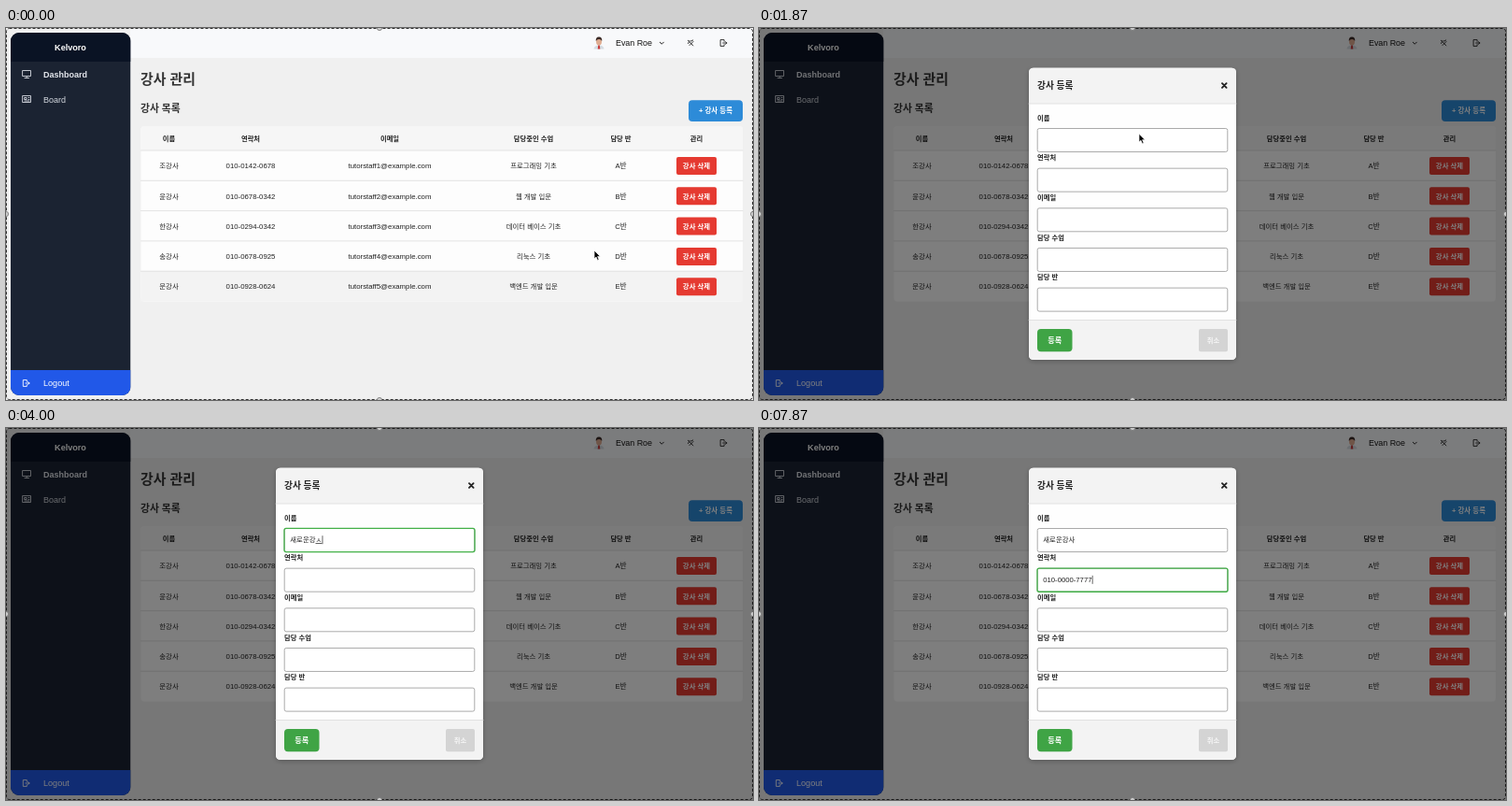
Write an HTML page that moves like this. It is 800 px wide and 398 px high and loops after 8000 ms.

```html
<!DOCTYPE html>
<html lang="ko">
<head>
<meta charset="utf-8">
<title>강사 관리</title>
<style>
html, body { margin: 0; width: 100%; height: 100%; overflow: hidden; background: #f0f0f0; }
svg { display: block; width: 100%; height: 100%; }
text { font-family: 'Liberation Sans', 'Noto Sans CJK KR', 'Noto Sans CJK', sans-serif; white-space: pre; }
.ui { font-family: Inter, 'Noto Sans CJK KR', 'Noto Sans CJK', sans-serif; }
.line { fill: none; stroke-linecap: round; stroke-linejoin: round; }
</style>
</head>
<body>
<svg id="stage" viewBox="0 0 800 398"></svg>
<script>
const LOOP = 8000, OPEN = 1000, FOCUS = 2250, TYPE = 2870, NEXT = 4700;
const ROW_TOP = 131, ROW_H = 32.3;
const teachers = [
  ['조강사', '010-0142-0678', '프로그래밍 기초', 'A반'],
  ['윤강사', '010-0678-0342', '웹 개발 입문', 'B반'],
  ['한강사', '010-0294-0342', '데이터 베이스 기초', 'C반'],
  ['송강사', '010-0678-0925', '리눅스 기초', 'D반'],
  ['문강사', '010-0928-0624', '백엔드 개발 입문', 'E반']
];
const labels = ['이름', '연락처', '이메일', '담당 수업', '담당 반'];
const fieldY = i => 107.5 + i * 42.65;
const strokes = ['ㅅ', '새', '샐', '새로', '새롱', '새로우', '새로운', '새로운ㄱ', '새로운가', '새로운강', '새로운강ㅅ', '새로운강사'];
const phone = '010-0000-7777';
const hints = [
  ['나도율', 'demo27', '배강사', '새로운강사', '새로운 강사', 'name52'],
  ['010-0231-0025', '010-0234-0056']
];

// Markup helpers
const rect = (x, y, w, h, fill, r = 0, more = '') =>
  `<rect x="${x}" y="${y}" width="${w}" height="${h}" rx="${r}" fill="${fill}" ${more}/>`;
const text = (x, y, s, size, fill = '#222', weight = 400, anchor = 'start', more = '') =>
  `<text x="${x}" y="${y}" font-size="${size}" fill="${fill}" font-weight="${weight}" text-anchor="${anchor}" ${more}>${s}</text>`;
const mid = (x, y, s, size, fill, weight) => text(x, y, s, size, fill, weight, 'middle');
const line = (d, color, w = 1) => `<path class="line" d="${d}" stroke="${color}" stroke-width="${w}"/>`;
const exitIcon = (x, y, color) =>
  line(`M${x + .8} ${y - 1.8}v-1.6h-4v6.8h4v-1.6M${x - .6} ${y}h4.2m-1.4-1.4l1.4 1.4l-1.4 1.4`, color, .9);

function sidebar() {
  return `<g clip-path="url(#side)">` + rect(5, 5, 128.5, 388, '#1b2332') +
    rect(5, 5, 128.5, 31, '#0a1324') + rect(5, 366, 128.5, 27, '#2158e8') + '</g>' +
    mid(69, 23.8, 'Kelvoro', 9.1, '#fff', 700) +
    text(40, 52.8, 'Dashboard', 9, '#e3e6ec', 700) +
    text(40, 79.5, 'Board', 9, '#d5d9e0') +
    text(40, 383, 'Logout', 9.1, '#fff') +
    line('M18 45.5h8.5v6h-8.5zM22.2 51.5v2M20 53.5h4.5', '#d5d9e0', .9) +
    line('M18 72.5h8.5v7h-8.5zM20 74.5h2v2h-2zM24 74.5h1M24 76.5h1M20 78h5', '#d5d9e0', .9) +
    exitIcon(21.5, 380, '#fff');
}

function topbar() {
  return rect(133, 0, 667, 32, '#f8f9fb') +
    '<path d="M629.5 22.5q.5-4 5.5-4t5.5 4z" fill="#d5dde3"/>' +
    '<ellipse cx="635" cy="14.5" rx="3" ry="4" fill="#dfac91"/>' +
    '<path d="M631.8 14q-.5-4.5 3.2-4.5t3.2 4.5q-1-2-3.2-2t-3.2 2z" fill="#3b2b27"/>' +
    '<path d="M634.2 18.5h1.6l.5 4h-2.6z" fill="#c93a3a"/>' +
    text(653, 19.3, 'Evan Roe', 8.9, '#111') +
    line('M700.3 15.2l2 2l2-2', '#222') +
    line('M730.3 13.2l5.6 5.6M730.5 16.5l1.6-3M733.3 14.2l2.4-1.2M732 18.5l4-4', '#222', .9) +
    exitIcon(768.3, 16, '#222');
}

function table() {
  const cols = [174.5, 262, 411, 565, 658.5, 739.5];
  let s = rect(144.5, 105, 644.5, 187.8, '#fdfdfd', 4) +
    '<path d="M144.5 131v-22q0-4 4-4h636.5q4 0 4 4v22z" fill="#f6f6f6"/>' +
    rect(144.5, 0, 644.5, ROW_H, '#f3f3f3', 0, 'id="hover"');
  ['이름', '연락처', '이메일', '담당중인 수업', '담당 반', '관리']
    .forEach((h, i) => s += mid(cols[i], 121, h, 7.3, '#222', 700));
  teachers.forEach(([name, tel, course, group], i) => {
    const y = ROW_TOP + i * ROW_H, b = y + 19.2;
    s += line(`M144.5 ${y}H789`, '#dcdcdc', .8) +
      mid(cols[0], b, name, 7.4) + mid(cols[1], b, tel, 7.8) +
      mid(cols[2], b, `tutorstaff${i + 1}@example.com`, 7.8) +
      mid(cols[3], b, course, 7.4) + mid(cols[4], b, group, 7.6) +
      rect(718, y + 7, 43, 19, '#e53a31', 2) + mid(cols[5], b, '강사 삭제', 7.4, '#fff', 700);
  });
  return s;
}

function modal() {
  let s = rect(0, 0, 800, 398, '#000', 0, 'opacity=".5"') +
    rect(289, 42.7, 222, 312.3, '#fefefe', 5, 'filter="url(#shadow)"') +
    '<path d="M289 81V47.7q0-5 5-5h212q5 0 5 5v33.3zM289 312.5v37.5q0 5 5 5h212q5 0 5-5v-37.5z" fill="#f3f3f3"/>' +
    line('M289 81H511M289 312.5H511', '#dcdcdc', .8) +
    text(298, 65, '강사 등록', 9.7, '#222', 700) +
    line('M496 59.2l4.6 4.6m0-4.6l-4.6 4.6', '#222', 1.9);
  labels.forEach((l, i) => s += text(298, fieldY(i) - 8.7, l, 7.3, '#222', 700) +
    rect(298.2, fieldY(i), 203.6, 25, '#fff', 2, 'stroke="#aaa"'));
  return s + rect(298, 322, 37.5, 24.3, '#3fa445', 4) + mid(316.7, 337.2, '등록', 8.2, '#fff', 700) +
    rect(471, 322, 31, 24.3, '#d4d4d4', 2) + mid(486.5, 336.8, '취소', 7.3, '#f6f6f6', 700) +
    rect(298, 0, 204, 25.2, 'none', 2, 'id="ring" stroke="#43b048" stroke-width="1.3"') +
    text(304.3, fieldY(0) + 14.8, '', 7.4, '#222', 400, 'start', 'id="name"') +
    text(304.3, fieldY(1) + 14.8, '', 7.7, '#222', 400, 'start', 'id="tel"') +
    rect(0, 0, .7, 9, '#222', 0, 'id="caret"') +
    '<g id="badge"><path d="M298 128l-1-2l5 .3z" fill="#1d5be0"/>' +
    rect(296.3, 126.2, 16.4, 12, '#1d5be0', 6) + mid(304.5, 134.4, '한', 6, '#fff') + '</g><g id="list"></g>';
}

const border = rect(.5, .5, 799, 397, 'none', 3, 'stroke="#ddd"') +
  rect(.5, .5, 799, 397, 'none', 3, 'stroke="#333" stroke-dasharray="3 2"');
const handles = [[400, 0], [400, 398], [0, 199], [800, 199]]
  .map(([x, y]) => `<circle cx="${x}" cy="${y}" r="2.6" fill="#ccc" stroke="#777" stroke-width=".8"/>`).join('');
const shadow = (id, dy, blur, alpha) =>
  `<filter id="${id}" x="-20%" y="-20%" width="140%" height="140%"><feDropShadow dx="0" dy="${dy}" stdDeviation="${blur}" flood-opacity="${alpha}"/></filter>`;

const $ = id => document.getElementById(id);
$('stage').innerHTML = `<defs><clipPath id="side">${rect(5, 5, 128.5, 388, '#000', 9)}</clipPath>` +
  shadow('shadow', 1.5, 2.5, .25) + shadow('soft', .5, 1, .25) + '</defs>' +
  rect(0, 0, 800, 398, '#f0f0f0') + topbar() + sidebar() +
  text(144, 59.5, '강사 관리', 14.9, '#333', 700) + text(144, 89.7, '강사 목록', 10.8, '#333', 700) +
  table() + rect(731, 77.3, 58, 22.7, '#2d8bd8', 4, 'id="add"') +
  '<path id="edge" class="line" d="M732 97.5q1 2.2 3 2.2h50q2 0 3-2.2" stroke="#4be04f" stroke-width="1.4"/>' +
  text(760, 91.4, '+ 강사 등록', 7.5, '#fff', 700, 'middle', 'id="addText"') +
  border + `<g id="modal">${modal()}</g>` + handles +
  '<path id="cursor" d="M0 0v8.8l2-1.8l1.5 3.4l1.6-.7l-1.5-3.3h2.8z" fill="#000" stroke="#fff" stroke-width=".7"/>';

// Pointer path: time, x, y
const path = [[-120, 630, 270], [0, 630, 238], [120, 630, 238], [620, 751, 86], [1120, 751, 86], [1950, 398, 114]];
function pointer(t) {
  const i = path.findIndex(p => p[0] > t);
  if (i < 0) return path.at(-1).slice(1);
  if (!i) return path[0].slice(1);
  const [a, b] = [path[i - 1], path[i]];
  const u = (t - a[0]) / (b[0] - a[0]), k = u * u * (3 - 2 * u);
  return [a[1] + (b[1] - a[1]) * k, a[2] + (b[2] - a[2]) * k];
}
const clamp = (v, lo, hi) => Math.max(lo, Math.min(hi, v));
const show = (id, on) => $(id).style.display = on ? '' : 'none';
const mix = (a, b, k) => `rgb(${a.map((v, i) => Math.round(v + (b[i] - v) * k))})`;

function drawList(field, typed) {
  const items = hints[field].filter(h => h.startsWith(typed) && h !== typed);
  show('list', items.length);
  const y = fieldY(field) + 30.5;
  $('list').innerHTML = rect(353, y, 86.7, items.length * 20 + 5, '#fafafa', 5, 'filter="url(#soft)"') +
    `<path d="M359.5 ${y + .5}l4.5-4l4.5 4z" fill="#fafafa"/>` +
    items.map((h, i) => text(359.7, y + 14.5 + i * 20, h, 6.85, '#222', 600, 'start', 'class="ui"')).join('');
}

function render(t) {
  const [x, y] = pointer(t), [hx, hy] = pointer(t - 120);
  $('cursor').setAttribute('transform', `translate(${x} ${y})`);
  show('cursor', t < TYPE);

  const row = Math.floor((hy - ROW_TOP) / ROW_H);
  show('hover', row >= 0 && row < 5 && hx < 789 && t < OPEN);
  $('hover').setAttribute('y', ROW_TOP + row * ROW_H);

  const pressed = t >= OPEN && t < OPEN + 120;
  const green = t < OPEN ? clamp((t - 570) / 250, 0, 1) : 0;
  $('add').setAttribute('fill', pressed ? '#a9aea9' : mix([45, 139, 216], [61, 147, 67], green));
  $('addText').setAttribute('fill', pressed ? '#7fdc80' : '#fff');
  show('edge', pressed);

  show('modal', t >= OPEN);
  if (t < OPEN) return;
  const field = t < NEXT ? 0 : 1, focused = t >= FOCUS;
  const name = t < TYPE ? '' : strokes[clamp(Math.floor((t - TYPE) / 112), 0, strokes.length - 1)];
  const tel = phone.slice(0, clamp(Math.floor((t - 5070) / 210), 0, phone.length));
  $('name').innerHTML = t < 4500 && name
    ? `${name.slice(0, -1)}<tspan text-decoration="underline">${name.slice(-1)}</tspan>` : name;
  $('tel').textContent = tel;

  // The caret blinks until typing begins
  show('caret', focused && (t >= TYPE || (t - FOCUS) % 1000 < 500));
  show('ring', focused);
  show('badge', focused && t < TYPE);
  $('ring').setAttribute('y', fieldY(field) - .1);
  $('caret').setAttribute('y', fieldY(field) + 7.7);
  $('caret').setAttribute('x', 304.6 + (field ? $('tel') : $('name')).getComputedTextLength());
  if (focused) drawList(field, field ? tel : name);
  else show('list', false);
}

const start = performance.now();
function tick() {
  render((performance.now() - start) % LOOP);
  requestAnimationFrame(tick);
}
tick();
</script>
</body>
</html>
```
